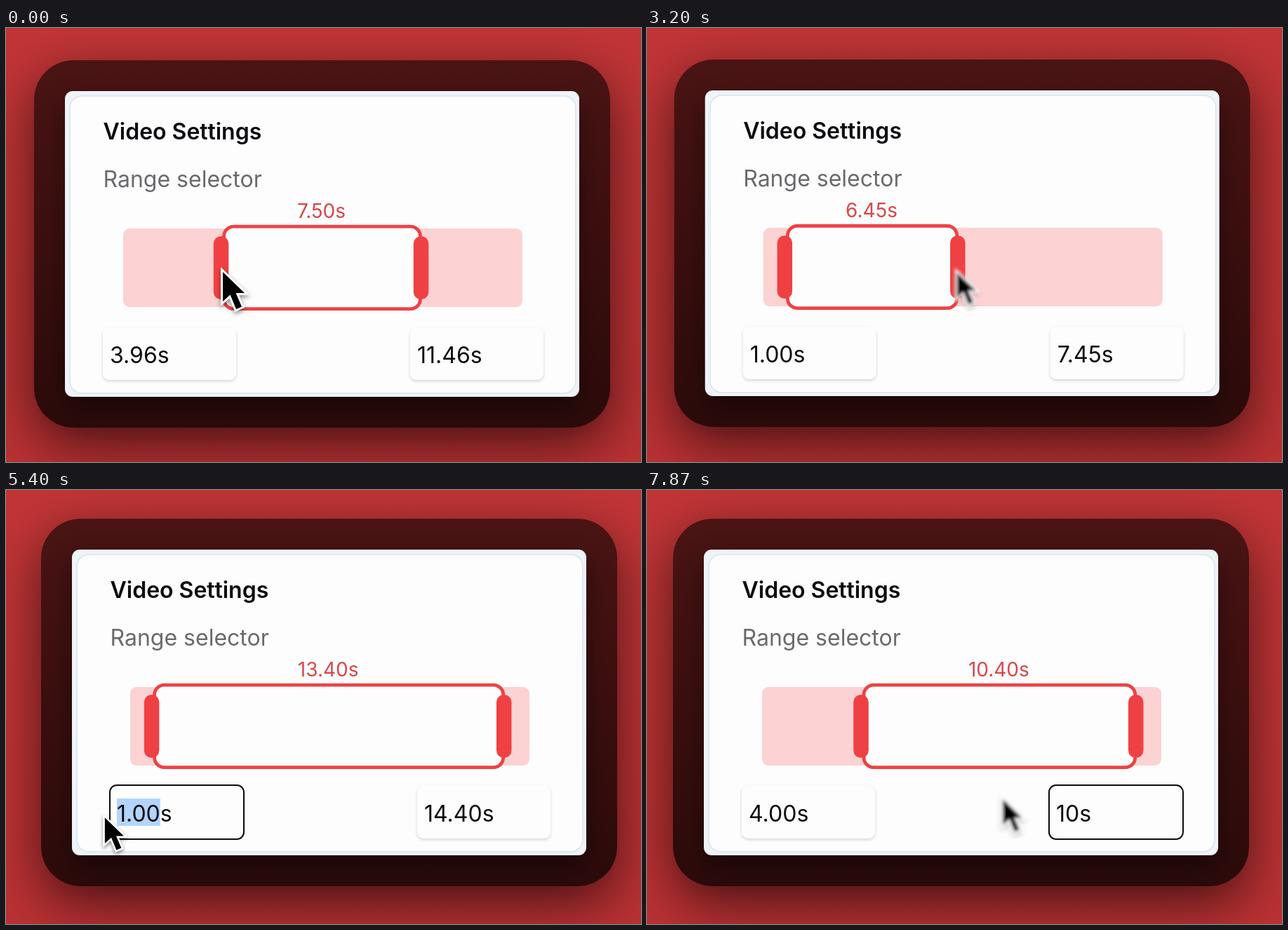
These frames come from a looping animation (905 px wide and 619 px high, 7.94 s). An HTML page:

```html
<!DOCTYPE html>
<html lang="en">
<head>
<meta charset="utf-8">
<title>Range selector</title>
<style>
  html, body { margin: 0; width: 100%; height: 100%; overflow: hidden; }
  body { position: relative; background: linear-gradient(#c23536, #ba3133); }
  #panel, svg { position: absolute; left: 0; top: 0; width: 905px; height: 619px; }
  svg { overflow: visible; font-family: Inter, sans-serif; font-optical-sizing: none; }
  #panel div { position: absolute; box-sizing: border-box; }
  .frame {
    left: 40px; top: 46px; width: 821px; height: 524px; border-radius: 56px;
    background: linear-gradient(#4a1414, #3c0f0f 50%, #2c0b0b);
    box-shadow: 0 24px 76px rgba(0, 0, 0, .6);
  }
  .window {
    left: 84px; top: 90px; width: 733px; height: 436px; border-radius: 11px;
    background: #eff4f8; box-shadow: 0 18px 38px rgba(0, 0, 0, .42);
  }
  .card {
    left: 90px; top: 96px; width: 723px; height: 426px; border-radius: 18px;
    background: #fdfdfd; border: 2px solid #dfe8ef;
  }
  #panel .input {
    top: 427px; width: 190px; height: 75px; border-radius: 9px;
    background: #fdfdfd; box-shadow: 0 2px 4px rgba(0, 0, 0, .16);
  }
  #panel .input.focus { box-shadow: none; }
  #panel .input.focus::after {
    content: ""; position: absolute; inset: -2.5px -1.5px -1.5px -1.5px;
    border: 2.5px solid #0b0b10; border-radius: 11px;
  }
  text { font-size: 32px; fill: #0b0b10; white-space: pre; }
  .shadow { filter: drop-shadow(0 3px 3px rgba(0, 0, 0, .45)); }
</style>
</head>
<body>
<div id="panel">
  <div class="frame"></div>
  <div class="window"></div>
  <div class="card"></div>
  <div class="input" id="inputA" style="left:138px"></div>
  <div class="input" id="inputB" style="left:576px"></div>
  <svg>
    <text x="138.5" y="159" font-weight="600">Video Settings</text>
    <text x="138.5" y="227" style="fill:#6a6a6e">Range selector</text>
    <rect x="167" y="286" width="569" height="112" rx="9" fill="#fcd2d3"/>
    <rect id="range" y="283.2" height="117.4" rx="14" fill="#fdfdfd" stroke="#ee4245" stroke-width="4.8"/>
    <rect id="handleA" y="297" width="21.5" height="90" rx="10.5" fill="#ef4144"/>
    <rect id="handleB" y="297" width="21.5" height="90" rx="10.5" fill="#ef4144"/>
    <text id="length" y="271" text-anchor="middle" style="font-size:28px;fill:#d9474b"></text>
    <rect id="mark" y="445" height="39" fill="#b3d5fb"/>
    <text id="valueA" x="148" y="478"></text>
    <text id="valueB" x="586" y="478"></text>
  </svg>
  <svg>
    <defs>
      <filter id="motion" x="-50%" y="-50%" width="200%" height="200%">
        <feGaussianBlur id="blur" stdDeviation="0"/>
      </filter>
      <path id="beam" d="M-10-26C-4-26 0-23 0-17V17C0 23-4 26-10 26M10-26C4-26 0-23 0-17M10 26C4 26 0 23 0 17M-5 0H5"/>
    </defs>
    <g id="cursor">
      <g class="shadow" id="arrow">
        <path d="M1 5V47L11.5 37.5L20 58L28 54.5L19.5 35H32Z" stroke="#fff" stroke-width="6" paint-order="stroke"/>
      </g>
      <g class="shadow" id="hand" stroke-linecap="round" stroke-linejoin="round">
        <path fill="#fff" stroke="#111" stroke-width="3" d="M-9 22C-10 15-21 7-21 1C-21-4-15-4-11 3L-15-12C-16-18-9-19-7-13L-4-4L-5-17C-5-23 2-23 3-17L4-5L6-16C7-21 13-20 12-14L11-3L14-9C16-14 22-12 21-7C20 2 19 9 15 14L14 22Z"/>
        <path fill="none" stroke="#777" stroke-width="2.6" d="M-3 3V13M3.5 3V13M10 3V13"/>
      </g>
      <g class="shadow" id="ibeam" fill="none" stroke-linecap="square">
        <use href="#beam" stroke="#fff" stroke-width="9"/>
        <use href="#beam" stroke="#0b0b10" stroke-width="4.5"/>
      </g>
    </g>
  </svg>
</div>
<script>
const LOOP = 7940, FPS = 15;
const el = id => document.getElementById(id);
const set = (id, attrs) => {
  for (const k in attrs) el(id).setAttribute(k, attrs[k]);
};
const within = (v, lo, hi) => v >= lo && v < hi;
const seconds = v => v.toFixed(2) + "s";

// Eased progress from 0 to 1 between two times
function move(t, from, to) {
  const u = Math.min(1, Math.max(0, (t - from) / (to - from)));
  return u * u * (3 - 2 * u);
}

// Moments at which an edit is committed or a field is entered
const enterA = 4980, typeA = 5730, commitA = 6130;
const enterB = 7050, typeB = 7450, keyGap = 140;

function rangeAt(t) {
  const slide = 4.632 * move(t, 1750, 2592);
  const a = t < commitA ? 3.96 + 1.672 * move(t, 150, 650) - slide : 4;
  const b = 11.46 - 1.091 * move(t, 950, 1350) - slide + 8.663 * move(t, 3000, 3700);
  return { a, b, xa: 160.8 + 36.8 * a, xb: 169.8 + 36.8 * b };
}

function cameraAt(t) {
  const drift = move(t, 2600, 3600), pan = move(t, 4050, 4950);
  return [
    -2 * drift + 12 * pan - 12 * move(t, 6050, 6700) - move(t, 6800, 7870),
    -1.5 * drift - 3.5 * pan
  ];
}

const gripA = r => [r.xa + 1.5, 343];
const gripB = r => [r.xb - 2, 345];
const middle = r => [(r.xa + r.xb) / 2 + 31, 331];
const spot = (x, y) => () => [x, y];

// The pointer travels to each place in turn and stays attached to it
const trips = [
  [650, 900, gripB],
  [1450, 1700, middle],
  [2680, 2940, gripB],
  [4000, 4780, spot(222, 468)],
  [enterA, 5330, spot(130, 468)],
  [commitA, 6710, spot(655, 465)],
  [6850, 7000, spot(669, 465)],
  [enterB, 7350, spot(565, 462)],
  [7620, 8070, spot(468, 427)]
];

function pointerAt(t) {
  const r = rangeAt(t);
  return trips.reduce((p, [from, to, place]) => {
    const k = move(t, from, to), q = place(r);
    return p.map((v, i) => v + (q[i] - v) * k);
  }, gripA(r));
}

function shapeAt(t, x, y, r) {
  const dragging = within(t, 150, 650) || within(t, 950, 1350) || within(t, 3000, 3850);
  const overField = within(x, 137, 328) || within(x, 575, 765);
  if (within(y, 427, 502) && overField) return "ibeam";
  if (within(y, 281, 403) && within(x, r.xa + 2, r.xb - 1) && !dragging) return "hand";
  return "arrow";
}

function drawRange({ a, b, xa, xb }) {
  set("range", { x: xa + 4, width: xb - xa - 5 });
  set("handleA", { x: xa - 10.75 });
  set("handleB", { x: xb - 10.75 });
  set("length", { x: (xa + xb) / 2 + 0.5 });
  el("length").textContent = seconds(b - a);
}

const typed = (digits, t, from) =>
  digits.slice(0, 1 + Math.floor((t - from) / keyGap)) + "s";

function drawInputs(t, { a, b }, x) {
  el("valueA").textContent = within(t, typeA, commitA) ? typed("4", t, typeA) : seconds(a);
  el("valueB").textContent = t >= typeB ? typed("10", t, typeB) : seconds(b);
  el("inputA").classList.toggle("focus", within(t, enterA, commitA));
  el("inputB").classList.toggle("focus", t >= enterB);

  // Digits are marked from their right end back to the pointer
  const text = el(t < commitA ? "valueA" : "valueB");
  const marking = within(t, enterA, typeA) || within(t, enterB, typeB);
  const left = +text.getAttribute("x");
  const right = left + text.getSubStringLength(0, text.textContent.length - 1);
  const from = Math.min(right, Math.max(left, x));
  set("mark", { x: from, width: marking ? right - from : 0 });
}

function drawPointer(t, x, y, shape) {
  for (const id of ["arrow", "hand", "ibeam"]) {
    el(id).style.display = id === shape ? "" : "none";
  }
  // The arrow shrinks on the first press
  set("arrow", { transform: `scale(${1 - 0.13 * move(t, 100, 300)})` });

  const p = pointerAt(t - 10), q = pointerAt(t + 10);
  const speed = Math.hypot(q[0] - p[0], q[1] - p[1]) / 20;
  const blur = Math.min(2, 13 * speed);
  set("blur", { stdDeviation: blur });
  set("cursor", {
    transform: `translate(${x} ${y})`,
    filter: blur > 0.3 ? "url(#motion)" : "none"
  });
}

function draw(now) {
  const t = Math.floor((now % LOOP + 1) * FPS / 1000) * 1000 / FPS;
  const r = rangeAt(t);
  const [cx, cy] = cameraAt(t);
  const [x, y] = pointerAt(t);
  el("panel").style.transform = `translate(${cx}px, ${cy}px)`;
  drawRange(r);
  drawInputs(t, r, x);
  drawPointer(t, x, y, shapeAt(t, x, y, r));
}

const origin = performance.now();
function tick() {
  draw(performance.now() - origin);
  requestAnimationFrame(tick);
}
tick();
</script>
</body>
</html>
```
